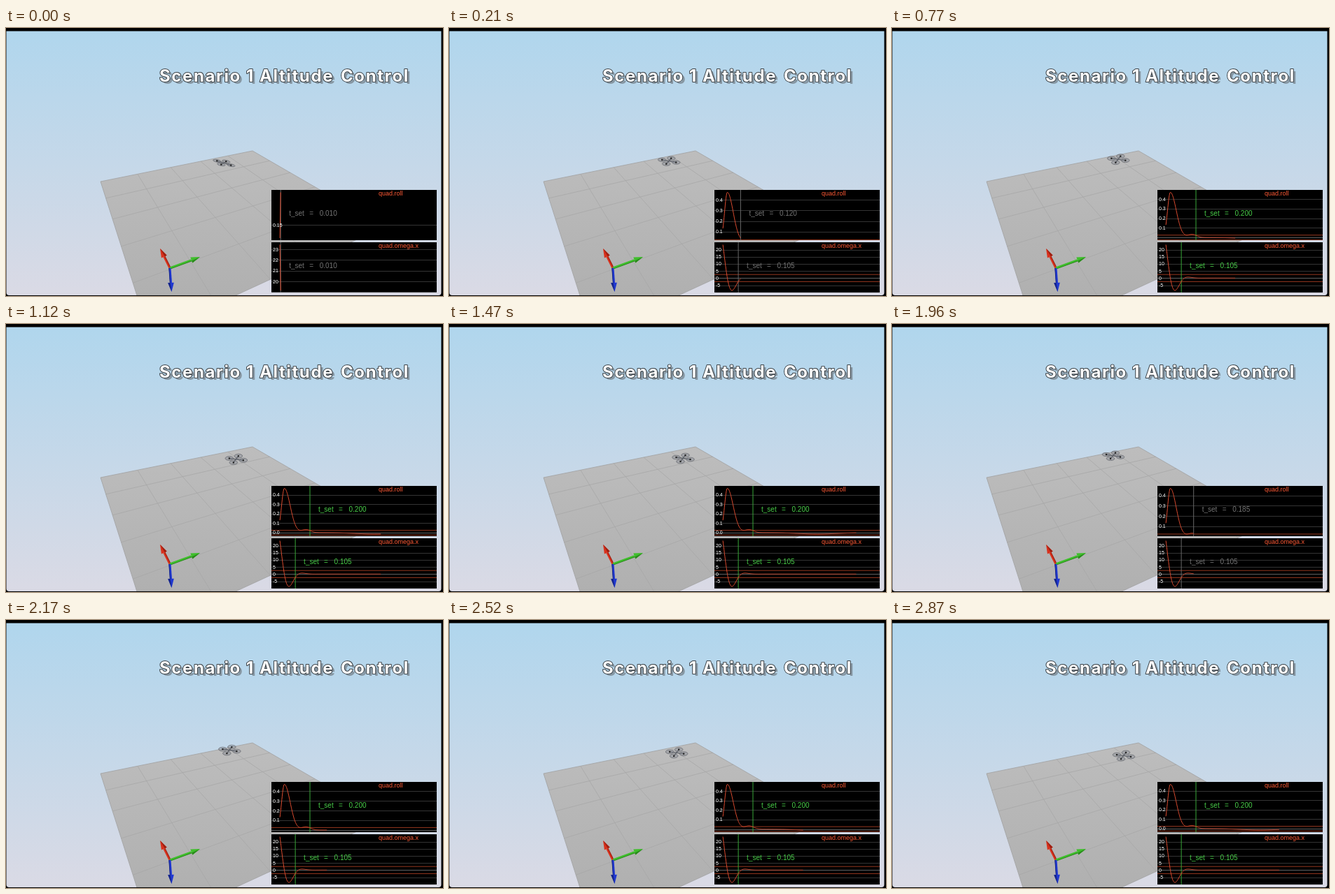
An HTML page with a canvas for the animation above (2940 ms loop, 624x384 px).

```html
<!DOCTYPE html>
<html lang="en">
<head>
<meta charset="utf-8">
<title>Scenario 1 Altitude Control</title>
<style>
html, body { margin: 0; width: 100%; height: 100%; overflow: hidden; background: #000; }
canvas { display: block; }
</style>
</head>
<body>
<canvas id="stage" width="624" height="384"></canvas>
<script>
const ctx = document.getElementById('stage').getContext('2d');
const LOOP = 2940, STEP = 70, RESTART = 1680;
const SANS = '"Liberation Sans", Arial, sans-serif';

// Simulated seconds; the flight starts over once within the loop
function simTime(ms) {
  const t = ms < RESTART ? .596 * ms / 1000 - .006 : .61 * (ms - RESTART) / 1000 + .012;
  return Math.max(.01, Math.round(t * 200) / 200);
}

const pulse = (t, center, width) => Math.exp(-(((t - center) / width) ** 2));

// Fast swing, small rebound, slow drift
const roll = t => .47 * pulse(t, .034, t < .034 ? .0257 : .0536)
  + .033 * pulse(t, .175, .04) - .015 * pulse(t, .62, .17);

// Damped oscillation
const omega = t => 29.7 * Math.exp(-12.6 * t - 67 * t * t) * Math.sin(34.5 * (.034 - t));

function path(points, close) {
  ctx.beginPath();
  points.forEach(([x, y]) => ctx.lineTo(x, y));
  if (close) ctx.closePath();
}

function line(points, color, width = 1) {
  path(points);
  ctx.strokeStyle = color;
  ctx.lineWidth = width;
  ctx.stroke();
}

function fill(points, color) {
  path(points, true);
  ctx.fillStyle = color;
  ctx.fill();
}

function text(string, x, y, color, font) {
  ctx.font = font;
  ctx.fillStyle = color;
  ctx.fillText(string, x, y);
}

function verticalGradient(y0, y1, from, to) {
  const gradient = ctx.createLinearGradient(0, y0, 0, y1);
  gradient.addColorStop(0, from);
  gradient.addColorStop(1, to);
  return gradient;
}

// Perspective map from the unit square to four corners
function perspective([ax, ay], [bx, by], [cx, cy], [dx, dy]) {
  const ux = bx - cx, uy = by - cy, vx = dx - cx, vy = dy - cy;
  const sx = ax - bx + cx - dx, sy = ay - by + cy - dy;
  const det = ux * vy - vx * uy;
  const g = (sx * vy - vx * sy) / det, h = (ux * sy - sx * uy) / det;
  return (u, v) => {
    const w = 1 + g * u + h * v;
    return [(ax + (bx * (1 + g) - ax) * u + (dx * (1 + h) - ax) * v) / w,
            (ay + (by * (1 + g) - ay) * u + (dy * (1 + h) - ay) * v) / w];
  };
}

const ground = perspective([135, 220], [352, 176], [540, 285], [205, 440]);

function drawGround() {
  fill([ground(0, 0), ground(1, 0), ground(1, 1), ground(0, 1)],
    verticalGradient(176, 384, '#bdbdbd', '#b0b0b0'));
  for (let i = 0; i <= 5; i++) {
    const color = i % 5 ? '#a8a8a8' : '#a0a0a0';
    line([ground(i / 5, 0), ground(i / 5, 1)], color, .8);
    line([ground(0, i / 5), ground(1, i / 5)], color, .8);
  }
}

function drawArrow(tipX, tipY, color, shade) {
  const x = 234, y = 344, length = Math.hypot(tipX - x, tipY - y);
  const neck = length - 13;
  ctx.save();
  ctx.translate(x, y);
  ctx.rotate(Math.atan2(tipY - y, tipX - x));
  line([[0, 0], [neck, 0]], color, 3);
  line([[0, 1.2], [neck, 1.2]], shade);
  fill([[length, 0], [neck, -4.3], [neck, 4.3]], color);
  fill([[length, 0], [neck, 1], [neck, 4.3]], shade);
  ctx.restore();
}

function drawDrone(t) {
  const tilt = roll(t), flat = Math.max(.2, 1 - 1.8 * tilt);
  const rotors = [[-10, -1], [3, -4], [10, 2], [-4, 5]]
    .map(([x, y]) => [x, y * flat + x * tilt * 1.1]);
  ctx.save();
  ctx.translate(311 + 27 * t, 190 + 4 * Math.cos(7.75 * (t - .736)));
  line([rotors[0], rotors[2]], '#5c6068', 1.4);
  line([rotors[1], rotors[3]], '#5c6068', 1.4);
  for (const [x, y] of rotors) {
    ctx.beginPath();
    ctx.ellipse(x, y, 5.8, 2.8 * flat, tilt, 0, 7);
    ctx.fillStyle = 'rgba(125,130,140,.4)';
    ctx.fill();
    ctx.strokeStyle = '#6a6d73';
    ctx.lineWidth = .8;
    ctx.stroke();
    ctx.fillStyle = '#222';
    ctx.fillRect(x - 1.1, y - 1.1, 2.2, 2.2);
  }
  ctx.restore();
}

function drawTitle() {
  const words = [['Scenario', 219], ['1', 343], ['Altitude', 362], ['Control', 478]];
  const font = '700 24px Inter, "Open Sans", sans-serif';
  ctx.letterSpacing = '1.6px';
  ctx.lineJoin = 'round';
  for (const [word, x] of words) text(word, x + 3.5, 80, '#8797a3', font);
  for (const [word, x] of words) {
    ctx.strokeStyle = '#3c4348';
    ctx.lineWidth = 2;
    ctx.strokeText(word, x, 76.5);
    text(word, x, 76.5, '#fff', font);
  }
  ctx.letterSpacing = '0px';
}

function drawPlot({ top, name, value, band, settle, steps }, t) {
  const samples = [];
  for (let s = .005; s < t + .001; s += .0025) samples.push([s, value(s)]);
  const values = samples.map(s => s[1]);
  const max = Math.max(...values), span = max - Math.min(...values);
  const px = s => 390 + 220 * s;
  const py = v => top + 2.5 + (max - v) * 65.5 / span;
  const across = (y, color) => line([[379, y], [615, y]], color);

  ctx.save();
  ctx.beginPath();
  ctx.rect(379, top - 1, 236, 72);
  ctx.clip();
  ctx.fillStyle = '#000';
  ctx.fillRect(379, top - 1, 236, 72);

  const step = steps.find(s => span / s < 8);
  const digits = step === .05 ? 2 : step < 1 ? 1 : 0;
  const labels = [];
  for (let n = Math.floor(max / step); py(n * step) < top + 71; n--) {
    const y = py(n * step);
    across(Math.round(y) + .5, n ? '#343434' : '#606060');
    if (y < top + 66.5) labels.push([(n * step).toFixed(digits), y + 2.5]);
  }
  across(py(band), '#94371f');
  across(py(-band), '#94371f');

  const setTime = Math.min(t, settle), x = px(setTime);
  const settled = t - settle > .1;
  line([[x, top - 1], [x, top + 71]], settled ? '#38a838' : '#686868');
  const color = settled ? '#48cc48' : '#747474';
  const font = '10px ' + SANS;
  text('t_set', x + 12, top + 36, color, font);
  text('=', x + 41, top + 36, color, font);
  text(setTime.toFixed(3), x + 55.5, top + 36, color, font);

  line(samples.map(([s, v]) => [px(s), py(v)]), '#dc4c30');
  for (const [label, y] of labels) text(label, 381, y, '#fff', '7px ' + SANS);
  text(name, 532, top + 7, '#ff5a35', '9px ' + SANS);
  ctx.restore();
}

const plots = [
  { top: 233, name: 'quad.roll', value: roll, band: .025, settle: .2, steps: [.05, .1] },
  { top: 308, name: 'quad.omega.x', value: omega, band: 2.5, settle: .105, steps: [1, 5] }
];

function draw(now) {
  const t = simTime(Math.floor((now % LOOP) / STEP) * STEP);
  ctx.fillStyle = '#000';
  ctx.fillRect(0, 0, 624, 384);
  ctx.save();
  ctx.beginPath();
  ctx.roundRect(.5, 4.5, 621, 378.5, [0, 0, 4, 4]);
  ctx.fillStyle = verticalGradient(5, 383, '#b0d6ed', '#dadae5');
  ctx.fill();
  ctx.clip();
  drawGround();
  drawDrone(t);
  drawArrow(220, 316, '#d8301c', '#9c1e10');
  drawArrow(277, 328, '#3fbf2c', '#2a8a1c');
  drawArrow(236.5, 378, '#2038d0', '#142488');
  drawTitle();
  plots.forEach(plot => drawPlot(plot, t));
  ctx.restore();
}

const start = performance.now();
function tick() {
  draw(performance.now() - start);
  requestAnimationFrame(tick);
}
tick();
</script>
</body>
</html>
```
